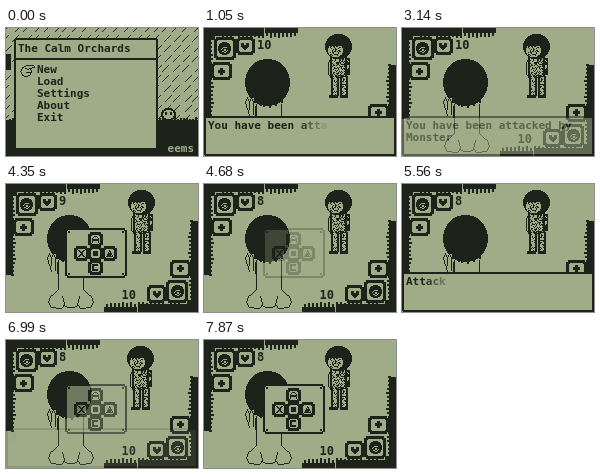
An HTML page with a canvas for the animation above (8 s loop, 192 px wide and 128 px high).

```html
<!DOCTYPE html>
<html lang="en">
<head>
<meta charset="utf-8">
<title>Handheld battle</title>
<style>
html, body { margin: 0; width: 100%; height: 100%; overflow: hidden; background: #9fac87; }
canvas { display: block; width: 100vw; height: 100vh; image-rendering: pixelated; }
</style>
</head>
<body>
<canvas id="stage" width="192" height="128"></canvas>
<script>
const W = 192, H = 128, LOOP = 8000, STEP = 110, START = 500;
const LIGHT = '#9fac87', DARK = '#1d221a';
const FACE = '"DejaVu Sans Mono", "Liberation Mono", monospace';
const main = document.getElementById('stage').getContext('2d');
const buffer = document.createElement('canvas');
buffer.width = W;
buffer.height = H;
const back = buffer.getContext('2d');
let g = main;

const clamp = v => Math.max(0, Math.min(1, v));
const ramp = (t, a, b) => clamp((t - a) / (b - a));
const noise = n => { const s = Math.sin(n * 91.7) * 4375.5; return s - Math.floor(s); };

function rect(x, y, w, h, c = DARK) {
  g.fillStyle = c;
  g.fillRect(x, y, w, h);
}

function disc(cx, cy, rx, ry, c = DARK) {
  for (let y = -ry; y <= ry; y++) {
    const w = Math.round(rx * Math.sqrt(1 - (y * y) / (ry * ry + ry)));
    rect(cx - w, cy + y, 2 * w + 1, 1, c);
  }
}

function rounded(x, y, w, h, cut, c) {
  rect(x + cut, y, w - 2 * cut, h, c);
  rect(x, y + cut, w, h - 2 * cut, c);
}

// Rounded box with a border of b pixels
function box(x, y, w, h, b = 1, cut = 1) {
  rounded(x, y, w, h, cut, DARK);
  rounded(x + b, y + b, w - 2 * b, h - 2 * b, cut - 1, LIGHT);
}

function path(points, c = DARK) {
  for (let i = 1; i < points.length; i++) {
    const [x0, y0] = points[i - 1], [x1, y1] = points[i];
    const n = Math.max(Math.abs(x1 - x0), Math.abs(y1 - y0), 1);
    for (let k = 0; k <= n; k++) {
      rect(Math.round(x0 + (x1 - x0) * k / n), Math.round(y0 + (y1 - y0) * k / n), 1, 1, c);
    }
  }
}

function text(s, x, y, c = DARK, align = 'left', size = 11) {
  g.font = `bold ${size}px ${FACE}`;
  g.textAlign = align;
  g.fillStyle = c;
  g.fillText(s, x, y);
}

function layer(alpha, draw) {
  if (alpha <= 0) return;
  back.clearRect(0, 0, W, H);
  g = back;
  draw();
  g = main;
  g.globalAlpha = alpha;
  g.drawImage(buffer, 0, 0);
  g.globalAlpha = 1;
}

// Scattered single pixels inside a rectangle
function speckle(x, y, w, h, share, c) {
  for (let j = 0; j < h; j++) {
    for (let i = 0; i < w; i++) {
      if (noise(x + i * 3 + j * 17) < share) rect(x + i, y + j, 1, 1, c);
    }
  }
}

function heart(x, y) {
  rect(x - 4, y - 3, 3, 4);
  rect(x + 1, y - 3, 3, 4);
  for (let i = 0; i < 4; i++) rect(x - 4 + i, y - 1 + i, 8 - 2 * i, 2);
}

function plus(x, y, r) {
  rect(x - 1, y - r, 3, 2 * r + 1);
  rect(x - r, y - 1, 2 * r + 1, 3);
}

function faceIcon(x, y) {
  disc(x, y, 6, 6);
  path([[x - 3, y + 1], [x - 1, y - 1], [x + 2, y - 1]], LIGHT);
  path([[x - 2, y + 3], [x + 1, y + 4], [x + 3, y + 2]], LIGHT);
  rect(x, y + 1, 2, 2, LIGHT);
}

function corner() {
  rect(0, 0, 60, 8);
  rect(61, 0, 33, 5);
  rect(0, 0, 11, 12);
  rect(0, 0, 7, 91);
  for (let i = 0; i < 23; i++) {
    rect(i * 4 + 2, 5, 2, 3 + Math.round(noise(i) * 2));
    rect(5, i * 4 + 2, 3 + Math.round(noise(i + 40) * 2), 2);
  }
  box(10, 9, 22, 23, 3, 2);
  box(32, 9, 19, 18, 3, 2);
  box(7, 34, 21, 18, 3, 2);
}

function hud(shift, score) {
  g.save();
  g.translate(-shift, -shift);
  corner();
  faceIcon(20, 20);
  heart(41, 18);
  plus(17, 43, 3);
  text(score, 53, 21, DARK, 'left', 12);
  g.restore();

  g.save();
  g.translate(shift, shift);
  g.save();
  g.translate(W, H);
  g.rotate(Math.PI);
  corner();
  g.restore();
  faceIcon(171, 107);
  heart(151, 110);
  plus(174, 84, 3);
  text('10', 130, 115, DARK, 'right', 12);
  g.restore();
}

function monster(dx, dy) {
  g.save();
  g.translate(dx, dy);
  // torso and legs
  rect(126, 28, 17, 22);
  rect(128, 29, 13, 20, LIGHT);
  rect(127, 48, 8, 20);
  rect(129, 48, 4, 19, LIGHT);
  rect(136, 48, 8, 20);
  rect(138, 48, 4, 19, LIGHT);
  rect(125, 67, 9, 3);
  rect(136, 67, 8, 3);
  speckle(128, 29, 13, 20, 0.42, DARK);
  speckle(129, 48, 4, 19, 0.25, DARK);
  speckle(138, 48, 4, 19, 0.35, DARK);
  // arms
  path([[126, 30], [124, 35], [124, 46], [127, 48]]);
  rect(142, 30, 4, 17);
  speckle(143, 32, 2, 10, 0.5, LIGHT);
  // head turned to the left
  disc(134, 18, 13, 12);
  disc(131, 22, 7, 6, LIGHT);
  rect(124, 14, 15, 4);
  speckle(126, 18, 11, 10, 0.35, DARK);
  g.restore();
}

function hero() {
  const side = [[52, 76], [52, 105], [48, 109], [44, 112], [42, 118], [45, 123], [55, 124], [58, 120], [56, 112]];
  const mirror = side.map(([x, y]) => [129 - x, y]);
  g.fillStyle = LIGHT;
  g.beginPath();
  for (const [x, y] of side.concat([...mirror].reverse())) g.lineTo(x, y);
  g.fill();
  path(side);
  path(mirror);
  path([[58, 121], [62, 123], [67, 123], [71, 121]]);
  rect(51, 78, 2, 12);
  // hair with a fringe along the bottom
  disc(63, 54, 22, 23);
  for (let x = 47; x < 80; x += 3) {
    const y = 54 + 23 * Math.sqrt(1 - ((x - 63) / 23) ** 2);
    rect(x, Math.round(y) - 3, 2, 3 + Math.round(noise(x) * 3));
  }
  // raised hand
  rect(42, 70, 8, 13, LIGHT);
  path([[43, 81], [41, 74], [43, 69], [45, 74], [45, 81]]);
  path([[45, 74], [47, 69], [49, 74], [49, 86]]);
  path([[43, 80], [45, 87]]);
}

function panel() {
  box(59, 44, 62, 50, 2, 2);
  for (const x of [62, 116]) for (const y of [47, 89]) rect(x, y, 2, 2);
  const button = (x, y) => box(x, y, 15, 15, 3, 2);
  button(82, 48);
  button(68, 62);
  button(96, 62);
  button(82, 76);
  button(82, 62);
  // shield, cross, square, roof and bag
  path([[86, 58], [86, 54], [88, 52], [90, 52], [92, 54], [92, 58]]);
  rect(87, 55, 5, 2);
  for (const d of [0, 1]) {
    path([[72 + d, 66], [77 + d, 72]]);
    path([[77 + d, 66], [72 + d, 72]]);
  }
  rect(87, 67, 5, 5);
  path([[100, 72], [103, 66], [106, 72], [100, 72]]);
  rect(102, 69, 3, 3);
  rect(86, 80, 6, 2);
  rect(86, 80, 2, 7);
  rect(86, 85, 6, 2);
}

// Letters appear one by one, each fading in
function dialog(lines, age) {
  box(0, 88, W, 40, 2);
  g.font = `bold 11px ${FACE}`;
  const wide = g.measureText('M').width;
  let n = 0;
  lines.forEach((line, row) => {
    for (let i = 0; i < line.length; i++, n++) {
      g.globalAlpha = ramp(age, n * 42, n * 42 + 200);
      text(line[i], 4 + i * wide, 101 + row * 12);
    }
  });
  g.globalAlpha = 1;
}

function menu() {
  rect(0, 0, W, H, LIGHT);
  for (let y = -4; y < 92; y += 10) {
    for (let x = -4; x < W; x += 10) {
      const s = Math.floor(noise(x + y * 7) * 4);
      path([[x + s, y + 7], [x + s + 6, y + 1]]);
    }
  }
  rect(0, 26, 5, 16);
  rect(0, 92, W, 36);
  for (let x = 0; x < W; x += 3) rect(x, 92 - Math.round(noise(x) * 3), 2, 4);
  disc(162, 86, 7, 6);
  disc(162, 86, 5, 4, LIGHT);
  rect(159, 84, 2, 3);
  rect(164, 84, 2, 3);
  text('eems', 188, 124, LIGHT, 'right');

  box(8, 10, 144, 112, 2);
  rect(8, 30, 144, 2);
  text('The Calm Orchards', 12, 24);
  ['New', 'Load', 'Settings', 'About', 'Exit'].forEach((s, i) => text(s, 31, 45 + i * 12));
  // pointing hand
  path([[16, 39], [20, 37], [27, 37], [28, 39], [23, 40], [25, 42], [24, 46], [20, 48], [16, 47], [14, 43], [16, 39]]);
  path([[19, 40], [22, 41]]);
  path([[20, 44], [24, 44]]);
}

const talks = [
  { lines: ['You have been attacked by', 'Monster'], type: 306, from: 400, to: 3030 },
  { lines: ['Attack'], type: 5270, from: 5310, to: 6330 },
  { lines: ['Miss'], type: 6940, from: 6960, to: 7540 }
];

function panelAlpha(t) {
  if (t < 5000) return ramp(t, 3140, 3360) * (1 - ramp(t, 4420, 4770));
  if (t < 7300) return ramp(t, 6440, 6660) * (1 - ramp(t, 6890, 7160));
  return ramp(t, 7650, 7870);
}

function draw(t) {
  rect(0, 0, W, H, LIGHT);
  if (t < START) return menu();
  const slide = Math.round(24 * Math.pow(1 - ramp(t, 400, 1270), 3));
  const score = t < 4350 ? '10' : t < 4460 ? '9' : '8';
  const hit = t >= 4350 && t < 4680 ? 1 - ramp(t, 4350, 4680) : 0;
  hud(slide, score);
  monster(Math.round(3 * hit * Math.cos(t / 35)), -Math.round(5 * Math.sin(hit * Math.PI)));
  hero();
  layer(panelAlpha(t), panel);
  for (const d of talks) {
    const alpha = ramp(t, d.from, d.from + 220) * (1 - ramp(t, d.to, d.to + 230));
    layer(alpha, () => dialog(d.lines, t - d.type));
  }
  layer(1 - ramp(t, 400, 700), menu);
}

const begin = performance.now();
function tick() {
  const t = (performance.now() - begin) % LOOP;
  draw(t < START ? 0 : START + Math.floor((t - START) / STEP) * STEP);
  requestAnimationFrame(tick);
}
tick();
</script>
</body>
</html>
```
